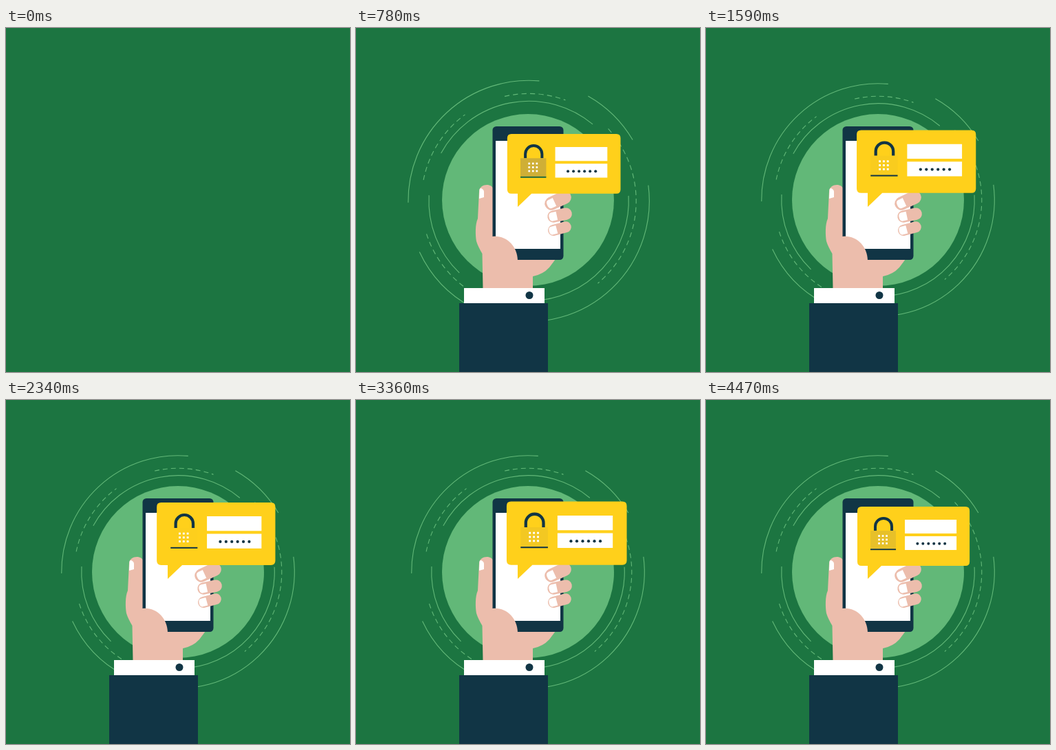
An HTML page that plays this animation: 500x500 px, repeating every 4530 ms.

```html
<!DOCTYPE html>
<html lang="en">
<head>
<meta charset="utf-8">
<title>Phone security</title>
<style>
  html, body { margin: 0; width: 100%; height: 100%; overflow: hidden; background: #1c7541; }
  svg { display: block; width: 100vw; height: 100vh; }
</style>
</head>
<body>
<svg viewBox="0 0 500 500">
  <rect width="500" height="500" fill="#1c7541"/>
  <g id="rings" fill="none" stroke="#62b878" stroke-width="1.1"></g>
  <circle id="disc" cx="250" cy="250" r="125" fill="#62b878"/>

  <g id="hand">
    <g fill="#ecbdac">
      <path d="M300 190C303 181 316 180 320.5 188C323 193 322 197 319 202L300 228Z"/>
      <path d="M179 237C180 226 198 225 200 235V300H290V336L281 348Q272 358 257 361V379H184.500L183.500 328Q177 317 175 310C173.500 302 173 285 177 277Z"/>
    </g>
    <path fill="#fff" d="M179.500 235Q180 232.500 182 233Q186 235 186 238V246L179 248Z"/>
    <rect x="198.500" y="143" width="103" height="194" rx="5.500" fill="#113545"/>
    <rect x="203" y="164" width="94" height="157" fill="#fff"/>
    <path fill="#ecbdac" d="M190 303H198.500C217 300.500 235 316 235 338H190Z"/>
    <g id="fingers"></g>
    <rect x="157" y="378" width="117" height="23" fill="#fff"/>
    <circle cx="252" cy="388.500" r="5.500" fill="#113545"/>
    <rect x="150" y="400" width="129" height="300" fill="#113545"/>
  </g>

  <g id="bubble">
    <path fill="#ffd01b" d="M226 155H377Q383 155 383 161V235Q383 241 377 241H255L235 260V241H226Q220 241 220 235V161Q220 155 226 155Z"/>
    <path fill="#fff" d="M289 174h75v20h-75zM289 198h75v20h-75z"/>
    <path d="M246 190V184A12 12 0 0 1 270 184V190" fill="none" stroke="#113545" stroke-width="4"/>
    <rect id="lock" x="239" y="190" width="37" height="26.500"/>
    <rect id="base" x="239" y="216.300" width="37" height="1.900"/>
    <g id="keys" fill="#fff"></g>
    <g id="dots" fill="#113545"></g>
  </g>
</svg>
<script>
const $ = id => document.getElementById(id);
const LOOP = 4530, TWEEN = 500;
const HAND_AT = 0, DISC_AT = 366, RINGS_AT = 546, BUBBLE_AT = 590;
const PULSE_AT = BUBBLE_AT + TWEEN, PULSE = 1720;

function add(parent, tag, attrs) {
  const el = document.createElementNS('http://www.w3.org/2000/svg', tag);
  for (const k in attrs) el.setAttribute(k, attrs[k]);
  return parent.appendChild(el);
}

function arc(r, from, to, dash) {
  const at = deg => {
    const a = deg * Math.PI / 180;
    return (250 + r * Math.cos(a)).toFixed(2) + ' ' + (250 + r * Math.sin(a)).toFixed(2);
  };
  const el = add($('rings'), 'path', { d: `M${at(from)}A${r} ${r} 0 0 1 ${at(to)}` });
  if (dash) el.setAttribute('stroke-dasharray', '7 5');
}

[[179.3, 275], [299.5, 329.5], [-7.5, 100], [118, 155]].forEach(a => arc(169.3, ...a));
[[208.6, 309.8], [134, 183.3], [-3, 88]].forEach(a => arc(140.3, ...a));
[[257, 290], [191.3, 233.6], [123, 163.7], [-42.3, 50]].forEach(a => arc(150.8, ...a, true));

// A finger is a capsule with a nail near its left end.
function finger(x, y, len, width, turn, nail) {
  const g = add($('fingers'), 'g', { transform: `translate(${x} ${y}) rotate(${turn})` });
  const r = width / 2, h = nail / 2;
  add(g, 'rect', { x: -r, y: -r, width: len + width, height: width, rx: r, fill: '#ecbdac' });
  add(g, 'path', { fill: '#fff', d: `M5 ${-h}H-2Q-6.5 ${-h} -6.5 0T-2 ${h}H5Z` });
}
finger(284, 255, 21, 19.5, -25, 13);
finger(287, 274, 18.5, 17.5, -12, 12.5);
finger(287, 294, 18.5, 16, -15, 12);

for (let i = 0; i < 9; i++) {
  add($('keys'), 'rect', { x: 250.2 + i % 3 * 5.5, y: 196.3 + Math.floor(i / 3) * 5.4, width: 2.7, height: 2.7 });
}
for (let i = 0; i < 6; i++) {
  add($('dots'), 'circle', { cx: 307.3 + i * 7.95, cy: 208.8, r: 2 });
}

function elastic(t, start) {
  const p = (t - start) / TWEEN;
  if (p <= 0) return 0;
  if (p >= 1) return 1;
  return 1 + 2 ** (-10 * p) * Math.sin((p - 0.075) * 2 * Math.PI / 0.3);
}

// Linear value between [time, value] points.
function track(points, t) {
  let [t0, v0] = points[0];
  for (const [t1, v1] of points) {
    if (t < t1) return t1 === t0 ? v0 : v0 + (v1 - v0) * (t - t0) / (t1 - t0);
    [t0, v0] = [t1, v1];
  }
  return v0;
}

const mix = (a, b, k) => `rgb(${a.map((v, i) => Math.round(v + (b[i] - v) * k))})`;

function scale(el, s, x, y) {
  el.setAttribute('visibility', s > 0 ? 'visible' : 'hidden');
  el.setAttribute('transform', `translate(${x} ${y}) scale(${Math.max(s, 0)}) translate(${-x} ${-y})`);
}

const SHADE = [[1080, 1], [1590, 0.12], [2340, 0.04], [3360, 0.25], [4470, 0.5]];

function draw(t) {
  $('hand').setAttribute('transform', `translate(0 ${400 * (1 - elastic(t, HAND_AT))})`);
  scale($('disc'), elastic(t, DISC_AT), 250, 250);
  scale($('rings'), elastic(t, RINGS_AT), 218.5, 207.5);

  const wave = t < PULSE_AT ? 0 : (1 - Math.cos((t - PULSE_AT) / PULSE * 2 * Math.PI)) / 2;
  scale($('bubble'), elastic(t, BUBBLE_AT) * (1 + 0.1 * wave), 235, 259.5);

  const shade = track(SHADE, t);
  $('lock').setAttribute('fill', mix([255, 208, 27], [207, 175, 54], shade));
  $('base').setAttribute('fill', mix([17, 53, 69], [28, 105, 60], Math.max(0, shade * 2 - 1)));
}

const begin = performance.now();
function tick() {
  draw((performance.now() - begin) % LOOP);
  requestAnimationFrame(tick);
}
draw(0);
requestAnimationFrame(tick);
</script>
</body>
</html>
```
